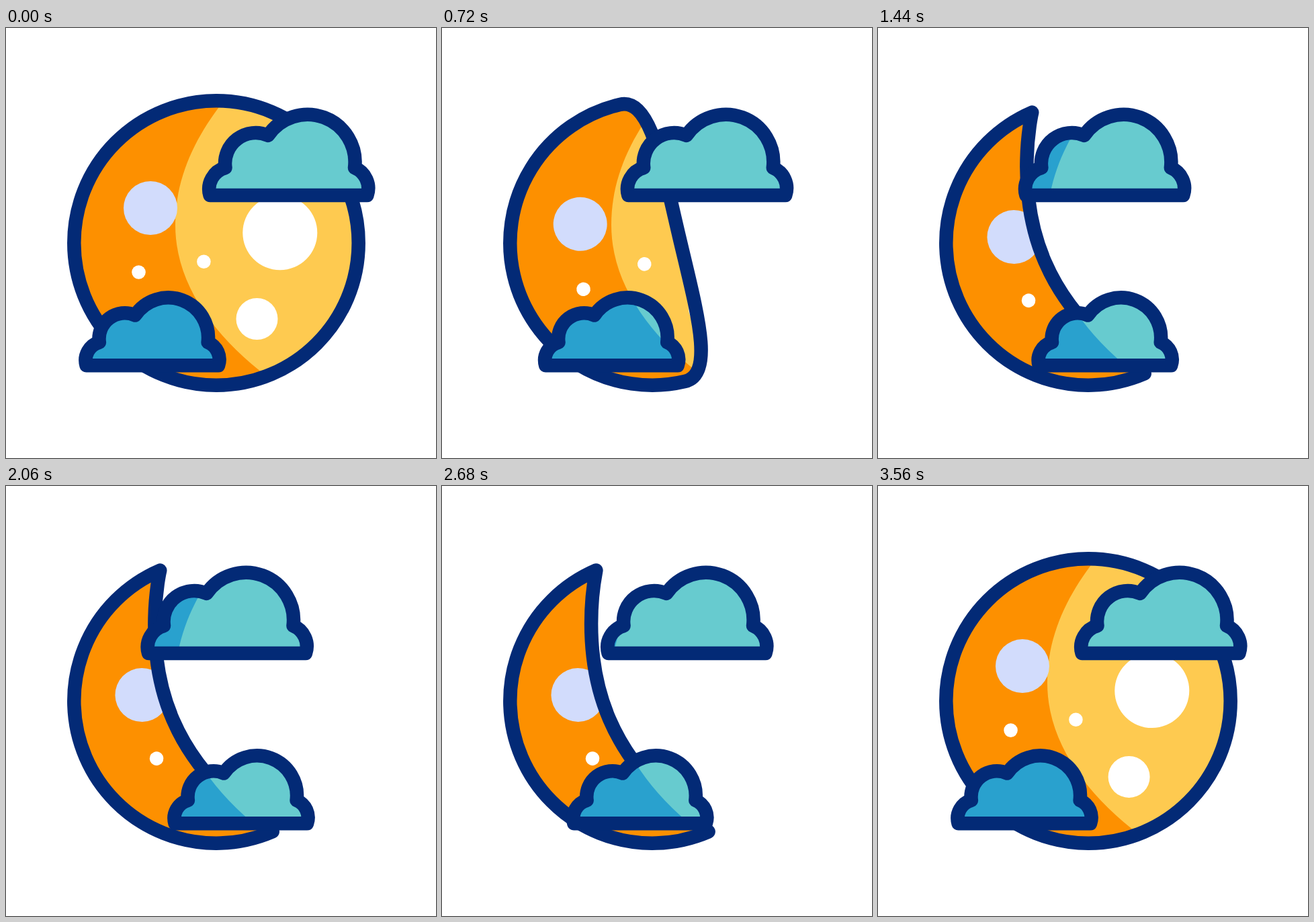
Write an HTML page that moves like this. It is 640 by 640 pixels and loops after 3600 ms.

```html
<!DOCTYPE html>
<html lang="en">
<head>
<meta charset="utf-8">
<title>Moon phases</title>
<style>
  html, body { margin: 0; width: 100%; height: 100%; overflow: hidden; background: #fff; }
  svg { display: block; width: 640px; height: 640px; }
  .line { fill: none; stroke: #032a76; stroke-width: 20.5; stroke-linejoin: round; }
  .low .line { stroke-width: 24.4; }
  .orange { fill: #fd9000; }
  .yellow { fill: #feca50; }
  .blue { fill: #29a1ce; }
  .teal { fill: #67cbcf; }
</style>
</head>
<body>
<svg viewBox="0 0 640 640">
  <defs>
    <path id="moon"/>
    <!-- origin: left end of the base line -->
    <path id="cloud" d="M1.5 0A33 33 0 0 1 24.5 -41A45.5 45.5 0 0 1 88 -89A70.8 70.8 0 0 1 217 -41A33 33 0 0 1 235.5 0Z"/>
    <clipPath id="disc"><use href="#moon"/></clipPath>
    <clipPath id="light">
      <path d="M640 0H397L316 119C279 169 252 226 252 293C252 378 305 452 380 512L430 552L640 640Z"/>
    </clipPath>
  </defs>

  <g class="turn"><use href="#moon" class="orange"/></g>
  <g clip-path="url(#light)"><g class="turn"><use href="#moon" class="yellow"/></g></g>
  <g class="turn">
    <g clip-path="url(#disc)" fill="#fff">
      <circle cx="-98" cy="-52" r="40" fill="#d2dcfc"/>
      <circle cx="94.8" cy="-15.3" r="55.5"/>
      <circle cx="60.5" cy="113" r="31"/>
      <circle cx="-115.5" cy="43.5" r="10.3"/>
      <circle cx="-18.6" cy="27.8" r="10.3"/>
    </g>
    <use href="#moon" class="line"/>
  </g>

  <g class="high"><use href="#cloud" class="blue"/></g>
  <g class="low"><use href="#cloud" class="blue"/></g>
  <g clip-path="url(#light)">
    <g class="high"><use href="#cloud" class="teal"/></g>
    <g class="low"><use href="#cloud" class="teal"/></g>
  </g>
  <g class="high"><use href="#cloud" class="line"/></g>
  <g class="low"><use href="#cloud" class="line"/></g>
</svg>
<script>
const LOOP = 3600, R = 211.7, K = R * 0.5523, TILT = 23.3;
const moon = document.getElementById('moon');

// cubic-bezier(a, 0, b, 1)
function ease(u, a, b) {
  if (u <= 0) return 0;
  if (u >= 1) return 1;
  let lo = 0, hi = 1, s;
  for (let i = 0; i < 24; i++) {
    s = (lo + hi) / 2;
    const v = 1 - s;
    if (3 * a * s * v * v + 3 * b * s * s * v + s * s * s < u) lo = s; else hi = s;
  }
  return s * s * (3 - 2 * s);
}

// each leg: [start, end, a, b]; goes 0 to 1, holds, and returns to 0
const track = (out, back) => t => {
  const leg = ([from, to, a, b]) => ease((t - from) / (to - from), a, b);
  return leg(out) - leg(back);
};

const spin = track([150, 1150, 0.55, 0.549], [2650, 3600, 0.5, 0.5]);
const wane = track([150, 1150, 0.53, 0.52], [2640, 3462, 0.5, 0.5]);
const high = track([90, 1880, 0.43, 0.485], [2090, 3423, 0.5, 0.5]);
const low = track([140, 1860, 0.43, 0.485], [2066, 3406, 0.5, 0.5]);

function place(name, transform) {
  document.querySelectorAll('.' + name).forEach(el => el.setAttribute('transform', transform));
}

function draw(t) {
  const m = wane(t), x = R - 282 * m, h = K * (1 - m);
  moon.setAttribute('d',
    `M0 ${-R}C${h} ${-R} ${x} ${-K} ${x} 0C${x} ${K} ${h} ${R} 0 ${R}A${R} ${R} 0 0 1 0 ${-R}Z`);
  place('turn', `translate(313 320) rotate(${-TILT * spin(t)})`);
  place('high', `translate(${302 - 91.5 * high(t)} 249)`);
  place('low', `translate(${118.3 + 132 * low(t)} 502.3) scale(.84)`);
}

const start = performance.now();
function tick() {
  draw((performance.now() - start) % LOOP);
  requestAnimationFrame(tick);
}
tick();
</script>
</body>
</html>
```
